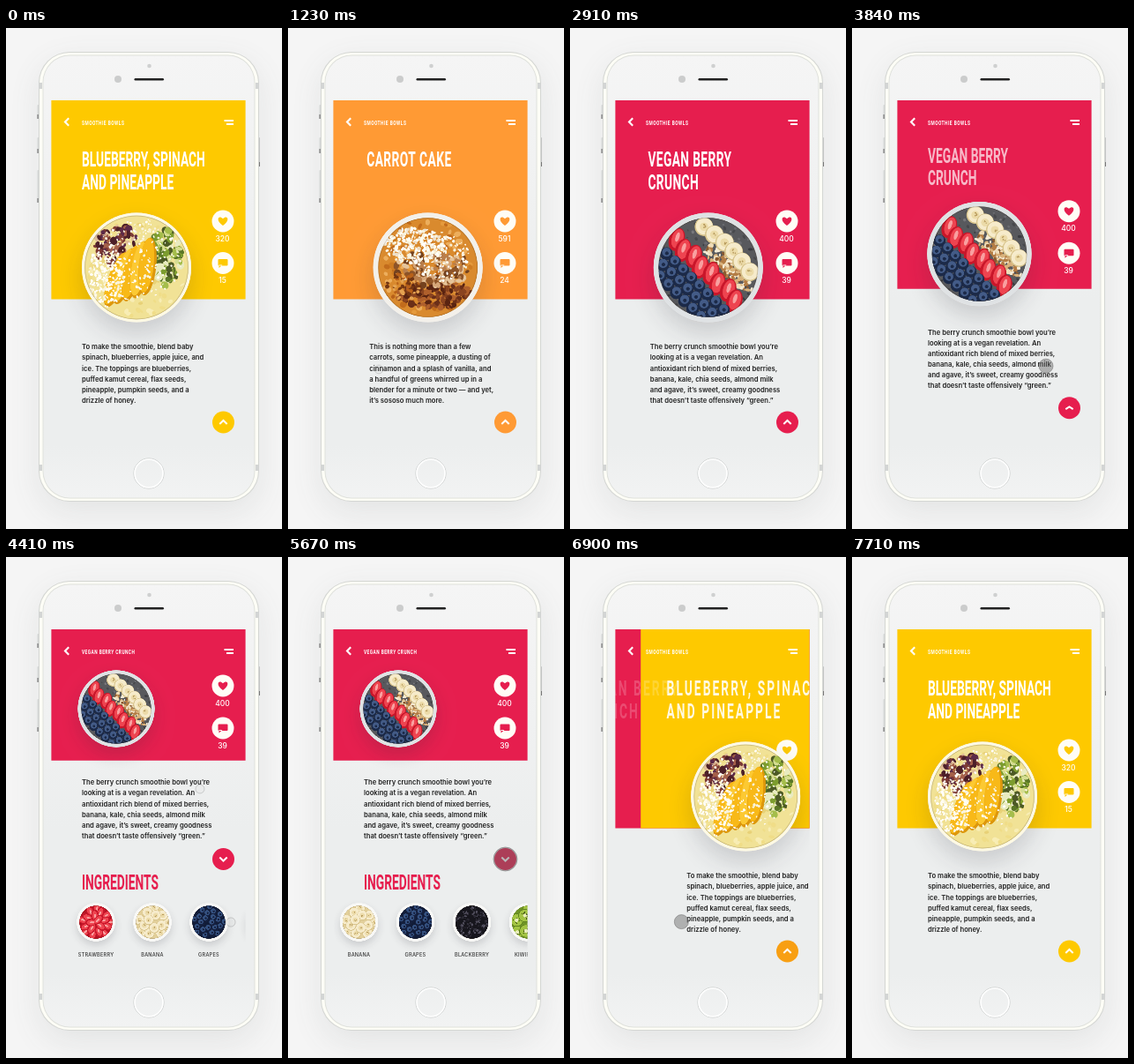
Write an HTML page with a canvas that moves like this. It is 313 by 568 pixels and loops after 7.83 s.

```html
<!DOCTYPE html>
<html lang="en">
<head>
<meta charset="utf-8">
<title>Smoothie bowls</title>
<style>
html, body { margin: 0; width: 100%; height: 100%; overflow: hidden; background: #f5f5f5; }
canvas { display: block; width: 313px; height: 568px; }
</style>
</head>
<body>
<canvas id="stage"></canvas>
<script>
const LOOP = 7830, W = 313, H = 568, TAU = Math.PI * 2;
const stage = document.getElementById('stage');
const dpr = window.devicePixelRatio || 1;
stage.width = W * dpr;
stage.height = H * dpr;
let c = stage.getContext('2d');

// ---------- helpers ----------
const mix = (a, b, k) => a + (b - a) * k;
const ramp = (t, a, b) => Math.min(1, Math.max(0, (t - a) / (b - a)));
const easeOut = (k, power = 3) => 1 - (1 - k) ** power;
const easeInOut = k => k < .5 ? 4 * k ** 3 : 1 - 4 * (1 - k) ** 3;
const rgb = v => `rgb(${v.map(Math.round)})`;
let seed = 1;
const rnd = () => (seed = seed * 16807 % 2147483647) / 2147483647;
const pick = list => list[Math.floor(rnd() * list.length)];

function group(draw, alpha = 1) {
  if (alpha <= 0) return;
  c.save();
  c.globalAlpha *= alpha;
  draw();
  c.restore();
}
function oval(x, y, rx, ry, angle, color) {
  c.fillStyle = color;
  c.beginPath();
  c.ellipse(x, y, rx, ry, angle, 0, TAU);
  c.fill();
}
const disc = (x, y, r, color) => oval(x, y, r, r, 0, color);
function box(x, y, w, h, r, color) {
  c.fillStyle = color;
  c.beginPath();
  c.roundRect(x, y, w, h, r);
  c.fill();
}
function line(points, color, width) {
  c.strokeStyle = color;
  c.lineWidth = width;
  c.beginPath();
  points.forEach(([x, y]) => c.lineTo(x, y));
  c.stroke();
}
function ring(x, y, r, color, width) {
  c.strokeStyle = color;
  c.lineWidth = width;
  c.beginPath();
  c.arc(x, y, r, 0, TAU);
  c.stroke();
}
function text(str, x, y, size, color, align = 'left', spacing = 0, weight = 500) {
  c.font = `${weight} ${size}px Inter, sans-serif`;
  c.letterSpacing = spacing + 'px';
  c.textAlign = align;
  c.fillStyle = color;
  c.fillText(str, x, y);
}
// Condensed display face
const NARROW = .6;
function display(str, x, y, size, color, spacing = 0) {
  c.save();
  c.translate(x, y);
  c.scale(NARROW, 1);
  c.font = `700 ${size}px Roboto, sans-serif`;
  c.letterSpacing = spacing / NARROW + 'px';
  c.textAlign = 'left';
  c.fillStyle = color;
  c.fillText(str, 0, 0);
  c.restore();
}

// ---------- food, painted once in a unit circle ----------
function dish(rim, inner, base, paint) {
  const canvas = document.createElement('canvas'), main = c;
  canvas.width = canvas.height = 256;
  c = canvas.getContext('2d');
  c.translate(128, 128);
  c.scale(127, 127);
  disc(0, 0, 1, rim);
  c.beginPath();
  c.arc(0, 0, inner, 0, TAU);
  c.clip();
  disc(0, 0, 1, base);
  paint();
  ring(0, 0, inner, 'rgba(60,40,20,.2)', .03);
  c = main;
  return canvas;
}
function scatter(n, x, y, sx, sy, size, colors) {
  for (let i = 0; i < n; i++) {
    const a = rnd() * TAU, d = Math.sqrt(rnd()), r = size * mix(.5, 1, rnd());
    oval(x + Math.cos(a) * d * sx, y + Math.sin(a) * d * sy, r, r * mix(.4, 1, rnd()), rnd() * 3, pick(colors));
  }
}
function berry(x, y, r, dark, light) {
  disc(x, y, r, dark);
  disc(x - r * .15, y - r * .2, r * .72, light);
  disc(x, y - r * .1, r * .28, dark);
}
function strawberry(x, y, r, angle) {
  group(() => {
    c.translate(x, y);
    c.rotate(angle);
    oval(0, 0, r * 1.2, r * .8, 0, '#c9162a');
    oval(-r * .1, -r * .05, r, r * .58, 0, '#ee4450');
    oval(-r * .25, 0, r * .5, r * .2, 0, '#f9a0a0');
  });
}
function banana(x, y, r) {
  disc(x, y, r, '#d8c48c');
  disc(x, y - r * .06, r * .9, '#f6ebcb');
  disc(x, y, r * .45, '#ecdba9');
  scatter(4, x, y, r * .25, r * .25, r * .12, ['#b79a5c']);
}
function pile(n, size, draw) {
  for (let i = 0; i < n; i++) {
    const a = i * 2.4, d = .82 * Math.sqrt(1 - i / n);
    draw(Math.cos(a) * d, Math.sin(a) * d, size, a);
  }
}

const COCONUT = ['#fff', '#fffdf0', '#f9f3dc'];
const bowls = [
  dish('#fdf9e4', .95, '#f1e296', () => {
    scatter(120, 0, 0, .9, .9, .06, ['#f8edb4', '#f0dd88', '#e8d177']);
    scatter(110, -.36, -.42, .42, .36, .075, ['#4d2028', '#7c3a35', '#a5604a', '#5d2b48', '#e0bd98']);
    scatter(130, .52, -.18, .3, .52, .085, ['#7c9c2e', '#a5bd4b', '#5b7726', '#d5dd92', '#e9ebc0', '#4d5a26']);
    for (let i = 0; i < 5; i++) {
      const x = -.36 + i * .14, y = .22 - i * .06, lean = .35 - i * .06;
      oval(x, y, .16, .53, lean, '#dd970c');
      oval(x - .02, y - .02, .135, .5, lean, i % 2 ? '#fcc932' : '#f8b918');
    }
    scatter(190, -.55, .15, .33, .6, .035, COCONUT);
    scatter(190, 0, -.15, .82, .75, .028, COCONUT);
  }),
  dish('#f3f0ea', .91, '#d98a2e', () => {
    scatter(140, 0, 0, .88, .88, .07, ['#e59a3c', '#cf7c22', '#edae5c', '#c26c1c']);
    scatter(150, .15, .5, .7, .24, .07, ['#5a2411', '#8a4420', '#6b2f18', '#b0602c']);
    scatter(150, .08, .02, .7, .32, .075, ['#8d5428', '#b97e4c', '#d6a678', '#74421f', '#e6c49a']);
    scatter(60, -.45, .35, .3, .25, .05, ['#743612', '#b8611a', '#e5a352']);
    scatter(260, -.25, -.4, .55, .32, .04, [...COCONUT, '#eee0cb']);
    scatter(120, .25, -.2, .5, .45, .03, COCONUT);
  }),
  dish('#dfe2e4', .91, '#58595d', () => {
    scatter(150, 0, 0, .9, .9, .04, ['#47484c', '#6a6b70', '#3a3b40', '#77777b']);
    c.rotate(.78);
    scatter(110, .25, -.24, .62, .17, .06, ['#d9b27c', '#b47d45', '#f0ddb8', '#8a5a30', '#f7ecd5']);
    for (let i = 0; i < 6; i++) banana(-.58 + i * .235, -.55 + Math.abs(i - 2.5) * .03, .17);
    for (let i = 0; i < 8; i++) strawberry(-.77 + i * .22, .04 + (i % 2) * .06, .18, 1.1);
    for (let row = 0; row < 3; row++)
      for (let i = 0; i < 8; i++)
        berry(-.72 + i * .21 + (row % 2) * .1, .36 + row * .19, .115, '#1c2a48', '#435b87');
  })
];
const WHITE = '#f8f8f6';
const ingredients = [
  ['STRAWBERRY', dish(WHITE, .86, '#b41424', () => pile(19, .24, strawberry))],
  ['BANANA', dish(WHITE, .86, '#e2cf9a', () => pile(13, .27, banana))],
  ['GRAPES', dish(WHITE, .86, '#111c38', () => pile(22, .18, (x, y, r) => berry(x, y, r, '#15203f', '#34507f')))],
  ['BLACKBERRY', dish(WHITE, .86, '#17161d', () => pile(15, .22, (x, y, r) => {
    disc(x, y, r, '#17161d');
    scatter(12, x, y, r * .8, r * .8, .07, ['#33313d', '#24222c', '#504d5c']);
  }))],
  ['KIWIFRUIT', dish(WHITE, .86, '#6f9426', () => pile(9, .34, (x, y, r) => {
    disc(x, y, r, '#62841f');
    disc(x, y, r * .9, '#a3c443');
    scatter(14, x, y, r * .55, r * .55, .035, ['#33420f']);
    disc(x, y, r * .28, '#e8edb9');
  }))]
];

function plate(image, x, y, r) {
  group(() => {
    c.shadowColor = 'rgba(40,40,50,.18)';
    c.shadowBlur = r * .45 * dpr;
    c.shadowOffsetY = r * .2 * dpr;
    disc(x, y, r - .5, '#eee');
  });
  c.drawImage(image, x - r, y - r, r * 2, r * 2);
}

// ---------- content ----------
const slides = [
  { color: [254, 201, 0], likes: 320, notes: 15, title: ['BLUEBERRY, SPINACH', 'AND PINEAPPLE'],
    body: ['To make the smoothie, blend baby', 'spinach, blueberries, apple juice, and', 'ice. The toppings are blueberries,',
      'puffed kamut cereal, flax seeds,', 'pineapple, pumpkin seeds, and a', 'drizzle of honey.'] },
  { color: [255, 154, 52], likes: 591, notes: 24, title: ['CARROT CAKE'],
    body: ['This is nothing more than a few', 'carrots, some pineapple, a dusting of', 'cinnamon and a splash of vanilla, and',
      'a handful of greens whirred up in a', 'blender for a minute or two — and yet,', 'it’s sososo much more.'] },
  { color: [230, 30, 78], likes: 400, notes: 39, title: ['VEGAN BERRY', 'CRUNCH'],
    body: ['The berry crunch smoothie bowl you’re', 'looking at is a vegan revelation. An', 'antioxidant rich blend of mixed berries,',
      'banana, kale, chia seeds, almond milk', 'and agave, it’s sweet, creamy goodness', 'that doesn’t taste offensively “green.”'] }
];

function heart() {
  c.beginPath();
  c.moveTo(0, 5);
  c.bezierCurveTo(-9, -1, -5, -7.5, 0, -2.8);
  c.bezierCurveTo(5, -7.5, 9, -1, 0, 5);
  c.fill();
}
function bubble() {
  c.beginPath();
  c.roundRect(-5.5, -4.5, 11, 7.5, 1);
  c.moveTo(-4.5, 2);
  c.lineTo(-4.5, 5.5);
  c.lineTo(-.5, 2);
  c.fill('nonzero');
}
// "show" runs to 1.5: the badge grows first, then its number appears
function badge(y, show, color, shape, count) {
  const size = Math.min(1, show);
  if (size <= 0) return;
  group(() => {
    c.translate(246, y);
    c.scale(size, size);
    disc(0, 0, 12.5, '#fffdf6');
    c.fillStyle = color;
    shape();
  });
  group(() => text(count, 245.5, y + 22.5 + 8 * (1.5 - show), 8.5, '#fff', 'center'), ramp(show, .9, 1.5));
}

function drawSlide(index, pose, open) {
  const s = slides[index], color = rgb(s.color);
  group(() => s.title.forEach((row, i) =>
    display(row, 86 + pose.titleX, 157.2 + 25.8 * i - 30 * open, 23, '#fff', pose.spacing)), pose.titleAlpha * (1 - ramp(open, 0, .5)));
  badge(mix(219, 146, open), pose.like, color, heart, s.likes);
  badge(mix(266.5, 194, open), pose.note, color, bubble, s.notes);
  group(() => s.body.forEach((row, i) =>
    text(row, 86 + pose.bodyX, 364.3 + 12.1 * i - 106 * open, 7.65, '#222', 'left', 0, 600)), pose.alpha);
  group(() => plate(bowls[index], mix(148, 125, open) + pose.bowlX, mix(271.5, 172, open), mix(62.5, 44, open)), pose.alpha);
}

function drawIngredients(open, scroll, color) {
  group(() => {
    const dy = 22 * (1 - open);
    display('INGREDIENTS', 86, 377 + dy, 23, color);
    ingredients.forEach(([name, image], i) => {
      const x = 102 + 64 * i - scroll;
      plate(image, x, 414 + dy, 22);
      text(name, x, 452.5 + dy, 5.6, '#333', 'center', .25);
    });
  }, ramp(open, .45, 1));
}

function drawTouch(t, start, end, x0, y0, x1, y1, size = 8) {
  const show = Math.min(ramp(t, start, start + 150), 1 - ramp(t, end, end + 200));
  if (show <= 0) return;
  const k = easeInOut(ramp(t, start + 150, end)), x = mix(x0, x1, k), y = mix(y0, y1, k), r = size * mix(.5, 1, show);
  disc(x, y, r, `rgba(100,100,100,${.45 * show ** 2})`);
  ring(x, y, r, `rgba(120,120,120,${.6 * Math.sqrt(show)})`, 1);
}

// ---------- phone ----------
function drawPhone() {
  c.fillStyle = '#f5f5f5';
  c.fillRect(0, 0, W, H);
  group(() => {
    c.shadowColor = 'rgba(90,100,100,.13)';
    c.shadowBlur = 36 * dpr;
    c.shadowOffsetY = 12 * dpr;
    box(39, 28, 247, 508, 34, '#eee');
  });
  [[87, 16], [124, 18], [161, 37]].forEach(([y, h]) => {
    box(35.5, y, 2, h, 1, '#d5d7d6');
    box(35.5, y + h - 5, 1.2, 5, 0, '#777');
  });
  box(286.5, 124, 1.5, 33, 1, '#c4c6c5');
  box(287, 152, 1, 5, 0, '#777');
  box(37, 27, 250, 510, 35, '#d4d6d3');
  box(38, 28, 248, 508, 34, '#fdfdf6');
  [62, 495].forEach(y => {
    box(37, y, 4, 7, 0, '#d3d5d4');
    box(283, y, 4, 7, 0, '#d3d5d4');
  });
  box(41.5, 30.5, 241, 503, 31, '#dfe1dc');
  const face = c.createLinearGradient(0, 31, 0, 533);
  face.addColorStop(0, '#f5f5f5');
  face.addColorStop(.55, '#eceeee');
  face.addColorStop(.88, '#eceeee');
  face.addColorStop(1, '#f2f3f3');
  box(42.5, 31.5, 239, 501, 30, face);
  disc(162.5, 43, 2.3, '#cfd0d0');
  disc(127, 58, 4, '#cbcccc');
  box(145.5, 57, 33.5, 2.4, 1.2, '#222');
  ring(162, 505, 17, '#c9cccb', 1);
  ring(162, 505, 16, '#fff', 1.6);
}

const SWIPES = [330, 1980, 6330];

function draw(time) {
  const t = time % LOOP;
  c.setTransform(dpr, 0, 0, dpr, 0, 0);
  drawPhone();

  const done = SWIPES.filter(s => s <= t).length;
  const u = done ? t - SWIPES[done - 1] : 2000;
  const to = done % 3, from = (done + 2) % 3;
  const open = easeInOut(ramp(t, 3560, 4390)) - easeInOut(ramp(t, 5850, 6390));
  const scroll = 85.5 * easeOut(ramp(t, 4560, 5600));

  const rest = 1 - easeOut(ramp(u, 150, 1250));
  const tail = 1 - easeOut(ramp(u, 150, 1380));
  const wipe = 1 - easeOut(ramp(u, 150, 850), 2.2);
  const fade = ramp(u, 150, 450);
  const incoming = {
    titleX: 100 * rest, spacing: 7.2 * tail, titleAlpha: ramp(u, 150, 630), alpha: ramp(u, 150, 300),
    bodyX: 197 * rest, bowlX: 180 * tail,
    like: 1.5 * ramp(u, 400, 670), note: 1.5 * ramp(u, 580, 850)
  };
  const outgoing = {
    titleX: -98 * (1 - rest), spacing: 2.7 * (1 - rest), titleAlpha: 1 - ramp(u, 150, 680), alpha: 1 - fade,
    bodyX: -200 * (1 - rest), bowlX: -220 * (1 - rest),
    like: 1.5 * (1 - ramp(u, 100, 350)), note: 1.5 * (1 - ramp(u, 100, 350))
  };

  c.save();
  c.beginPath();
  c.rect(51.4, 82, 220.2, 404);
  c.clip();
  const panel = (index, x) => box(x, 82, 272 - x, mix(225.6, 148.8, open), 0, rgb(slides[index].color));
  if (wipe > 0) panel(from, 51);
  if (wipe < 1) panel(to, 51 + 221 * wipe);
  // A closing detail view may still overlap the start of a swipe
  if (u < 850) drawSlide(from, outgoing, open);
  if (u > 150) drawSlide(to, incoming, open);

  const tint = slides[from].color.map((v, i) => mix(v, slides[to].color[i], ramp(u, 150, 710)));
  if (open > 0) drawIngredients(open, scroll, rgb(slides[2].color));

  const by = mix(447, 342.5, open), tip = 2 * (1 - 2 * open);
  disc(246.5, by, 12.5, rgb(tint));
  line([[242.3, by + tip], [246.5, by - tip], [250.7, by + tip]], '#fff', 2);

  line([[71.2, 102.3], [67, 106.5], [71.2, 110.7]], '#fff', 2.1);
  line([[247.5, 105], [258, 105]], '#fff', 2);
  line([[250, 109], [258, 109]], '#fff', 2);
  group(() => display('SMOOTHIE BOWLS', 86, 109.5, 8, '#fff', .5), 1 - ramp(open, .2, .6));
  group(() => display('VEGAN BERRY CRUNCH', 86, 109.5, 8, '#fff', .45), ramp(open, .5, .9));

  drawTouch(t, 330, 1075, 232, 398, 103, 387);
  drawTouch(t, 1980, 2680, 236, 408, 100, 400);
  drawTouch(t, 3500, 4260, 220, 400, 220, 263);
  drawTouch(t, 4370, 5100, 255, 414, 130, 414);
  drawTouch(t, 5490, 5720, 246.5, 342.5, 246.5, 342.5, 13.5);
  drawTouch(t, 6330, 7150, 240, 416, 97, 413);
  c.restore();
}

function tick() {
  draw(performance.now());
  requestAnimationFrame(tick);
}
tick();
</script>
</body>
</html>
```
